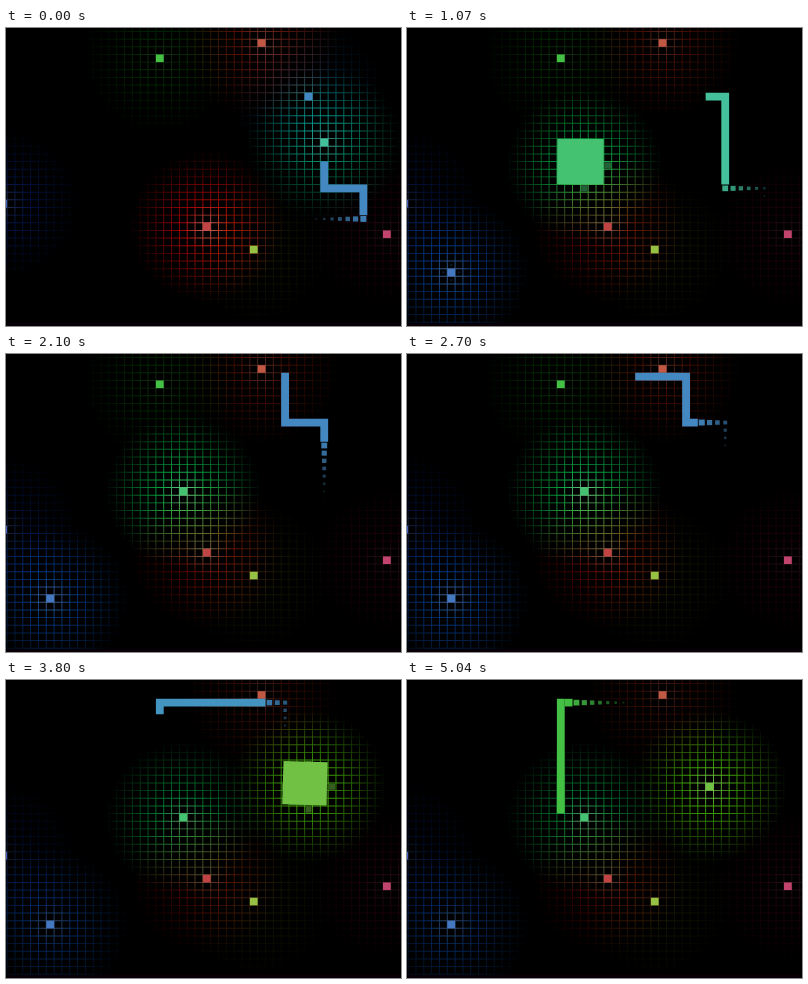
These frames come from a looping animation (395 by 298 pixels, 5.07 s). An HTML page with a canvas:

```html
<!DOCTYPE html>
<html>
<head>
<meta charset="utf-8">
<style>
html, body { margin: 0; width: 100%; height: 100%; overflow: hidden; background: #000; }
canvas { display: block; }
</style>
</head>
<body>
<canvas id="stage" width="395" height="298"></canvas>
<script>
const LOOP = 5070, FADE = 950, SHRINK = 440, BLEND = 500;
const ctx = document.getElementById('stage').getContext('2d');

// Snake speed picks up after the last meal.
const stepTime = k => k <= 37 ? k * 104 - 78 : 3770 + (k - 37) * 97;
const meals = [3, 11, 37];
const snakeLength = k => 12 + meals.filter(m => k >= m).length;
const tailAt = k => k - snakeLength(k) + 1;

// Corners of the route, in cells; the head is at index 0 when the loop starts.
const corners = [[36, 25], [46, 25], [46, 21], [41, 21], [41, 9], [36, 9], [36, 3], [20, 3], [20, 18]];
const FIRST = -22;
const route = [corners[0]];
corners.slice(1).forEach(([x, y]) => {
  let [a, b] = route[route.length - 1];
  while (a !== x || b !== y) {
    a += Math.sign(x - a);
    b += Math.sign(y - b);
    route.push([a, b]);
  }
});
const cellAt = n => route[n - FIRST];

// Newest first: column, row, hue, birth, death.
const [ate1, ate2, ate3] = meals.map(stepTime);
const foods = [
  [39, 14, 98, ate3, LOOP],
  [23, 18, 142, ate2, LOOP],
  [6, 32, 215, ate1, LOOP],
  [26, 26, 0, -9999, LOOP],
  [41, 15, 162, -9999, ate1],
  [33, 2, 10, -9999, LOOP],
  [0, 23, 225, -9999, LOOP],
  [39, 9, 207, -9999, ate2],
  [20, 4, 120, -9999, ate3],
  [49, 27, 340, -9999, LOOP],
  [32, 29, 80, -9999, LOOP]
];

const shades = [[0, 207], [ate1, 162], [ate2, 207], [ate3, 120]];
function snakeHue(t) {
  let hue = 207;
  for (const [start, next] of shades) {
    if (t >= start) hue += (next - hue) * Math.min(1, (t - start) / BLEND);
  }
  return hue;
}

const color = hue => `hsl(${hue}, 50%, 51%)`;

const grid = new Path2D();
for (let i = 0; i < 53; i++) grid.rect(i - 0.56, -1, 0.12, 42);
for (let j = 0; j < 41; j++) grid.rect(-1, j - 0.56, 54, 0.12);

function square(x, y, size) {
  ctx.fillRect(x - size / 2, y - size / 2, size, size);
}

function drawHalo([x, y, hue], rank) {
  const glow = ctx.createRadialGradient(x, y, 0, x, y, 10);
  glow.addColorStop(0, `hsl(${hue}, 45%, 58%)`);
  glow.addColorStop(0.3, `hsl(${hue}, 95%, 32%)`);
  glow.addColorStop(1, '#000');
  ctx.globalAlpha = 0.75 ** rank;
  ctx.fillStyle = glow;
  ctx.fill(grid);
}

function drawFood([x, y, hue, birth], t) {
  const age = t - birth;
  ctx.fillStyle = color(hue);
  if (age < 1300) {
    ctx.globalAlpha = 0.5 * (1 - age / 1300);
    for (let dx = -3; dx <= 3; dx++) {
      for (let dy = -3; dy <= 3; dy++) {
        const d = Math.hypot(dx, dy);
        const size = 0.83 - d * age * 0.00064;
        if (d && d <= 3 && size > 0.1) square(x + dx, y + dy, size);
      }
    }
  }
  ctx.globalAlpha = 1;
  const p = Math.min(1, age / SHRINK);
  const size = 6 - 5 * p;
  const shift = (1 - size) / 10;
  ctx.save();
  ctx.translate(x + shift, y + shift);
  ctx.rotate(0.14 * Math.sin(Math.PI * p));
  square(0, 0, size);
  ctx.restore();
}

function drawTrail(t) {
  for (let k = -9; stepTime(k) <= t; k++) {
    const dropped = stepTime(k), age = t - dropped;
    if (age >= FADE || tailAt(k) === tailAt(k - 1)) continue;
    const left = 1 - age / FADE;
    const [x, y] = cellAt(tailAt(k) - 1);
    ctx.globalAlpha = left;
    ctx.fillStyle = color(snakeHue(dropped));
    square(x, y, age < 30 ? 1 : 0.84 * left);
  }
  ctx.globalAlpha = 1;
}

function drawSnake(t) {
  let head = 0;
  while (stepTime(head + 1) <= t) head++;
  ctx.beginPath();
  for (let n = tailAt(head); n <= head; n++) {
    const [x, y] = cellAt(n);
    ctx.rect(x - 0.5, y - 0.5, 1, 1);
  }
  ctx.fillStyle = color(snakeHue(t));
  ctx.fill();
}

function draw(t) {
  ctx.setTransform(1, 0, 0, 1, 0, 0);
  ctx.globalAlpha = 1;
  ctx.fillStyle = '#000';
  ctx.fillRect(0, 0, 395, 298);
  // One unit is one cell, whole numbers are cell centres.
  ctx.setTransform(7.83, 0, 0, 7.65, -2.8, -0.3);
  const alive = foods.filter(f => t >= f[3] && t < f[4]);
  ctx.globalCompositeOperation = 'lighter';
  alive.forEach(drawHalo);
  ctx.globalCompositeOperation = 'source-over';
  ctx.globalAlpha = 1;
  ctx.fillStyle = '#080006';
  ctx.fillRect(-1, 38.6, 54, 2);
  drawTrail(t);
  alive.forEach(f => drawFood(f, t));
  drawSnake(t);
}

const start = performance.now();
function tick() {
  draw((performance.now() - start) % LOOP);
  requestAnimationFrame(tick);
}
tick();
</script>
</body>
</html>
```
